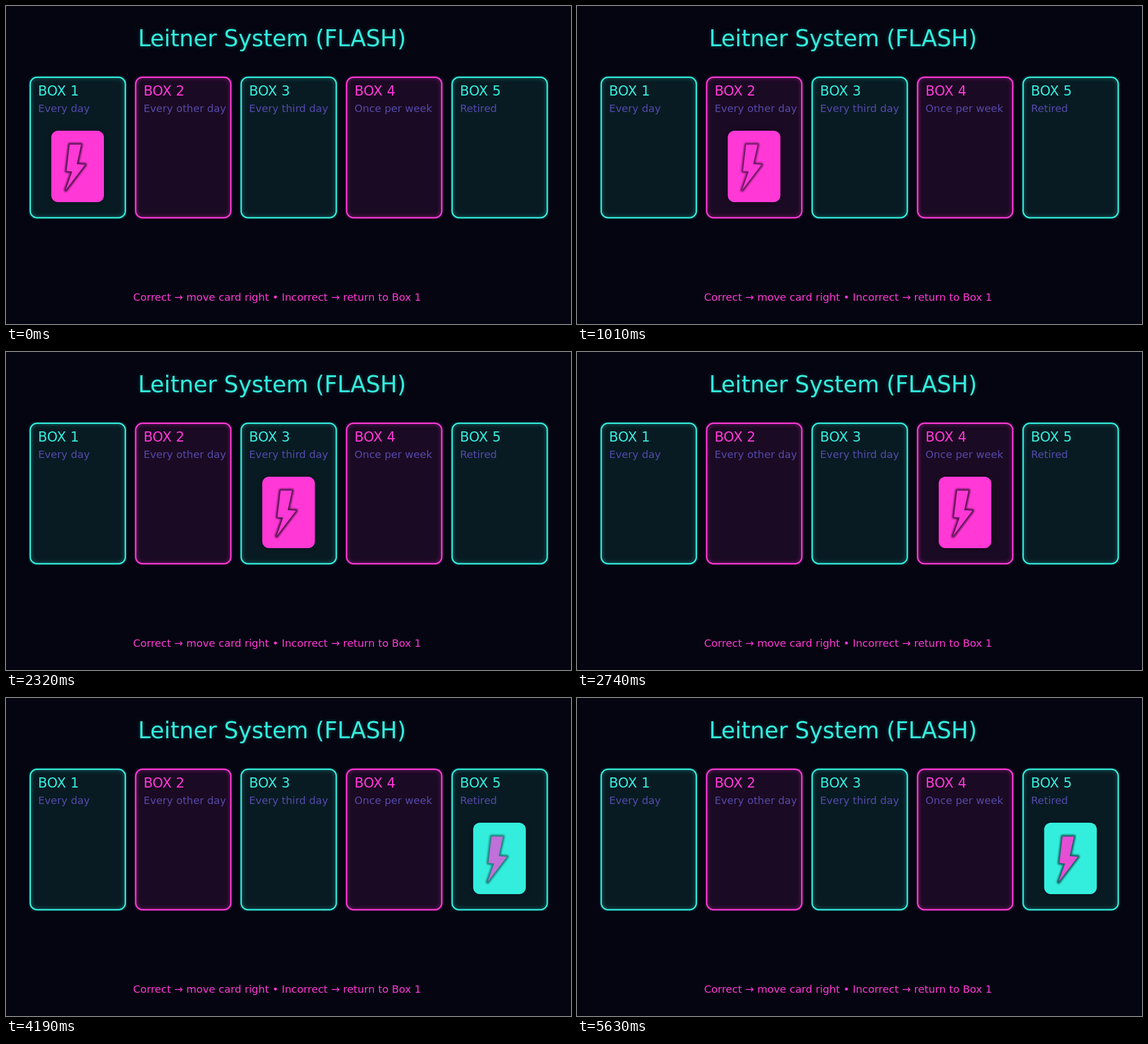
Animation, 998 px wide and 561 px high, one loop 5.75 s. Source, as an HTML page:

```html
<!DOCTYPE html>
<html lang="en">
<head>
<meta charset="utf-8">
<title>Leitner System</title>
<style>
  :root { --cyan: #33eedd; --pink: #ff38d6; --bg: #040511; }
  html, body { margin: 0; width: 100%; height: 100%; overflow: hidden; background: var(--bg); }
  #stage { position: absolute; left: 0; top: 0; width: 998px; height: 561px; overflow: hidden; }
  #stage > svg { position: absolute; left: 0; top: 0; }
  text { font-family: "DejaVu Sans", sans-serif; white-space: pre; }
  .title { font-size: 39.95px; fill: var(--cyan); text-shadow: 0 0 6px rgba(51, 238, 221, .3); }
  .rule { font-size: 18.35px; fill: var(--pink); }
  .name { font-size: 23.9px; fill: var(--hue); }
  .when { font-size: 18.3px; fill: #5549aa; }
  .fill { fill: var(--hue); fill-opacity: .09; }
  .halo {
    fill: none; stroke: var(--hue); stroke-width: 6; opacity: .24;
    filter: blur(3px); clip-path: inset(0 round 12px);
  }
  .edge { fill: none; stroke: var(--hue); stroke-width: 2.5; }
  #gold {
    position: absolute; left: 787px; top: 125px; width: 170px; height: 249px; border-radius: 13px;
    box-shadow: 0 0 10px rgba(120, 85, 30, .35), inset 0 0 46px rgba(120, 85, 30, .72);
    opacity: 0;
  }
  #card {
    position: absolute; left: 80px; top: 220px; width: 93px; height: 126px;
    border-radius: 12px; background: var(--pink); box-shadow: 0 0 7px rgba(4, 5, 16, .5);
  }
  #card svg { position: absolute; left: 0; top: 0; overflow: visible; }
  .bolt { fill: var(--pink); }
  .shade { fill: none; stroke: #040510; stroke-width: 6.5; stroke-linejoin: round; opacity: .68; filter: blur(1.4px); }
</style>
</head>
<body>
<div id="stage">
  <svg width="998" height="561" viewBox="0 0 998 561">
    <text class="title" x="233.2" y="71">Leitner System (FLASH)</text>
    <g id="boxes"></g>
    <text class="rule" x="224.4" y="520">Correct → move card right • Incorrect → return to Box 1</text>
  </svg>
  <div id="gold"></div>
  <div id="card">
    <svg width="93" height="126">
      <defs><polygon id="zigzag" points="32.5,24.5 52.5,24.5 45,59 59.5,60 25.5,104.5 37,72 27,71"/></defs>
      <g id="flash">
        <use class="shade" href="#zigzag"/>
        <use class="bolt" href="#zigzag"/>
      </g>
    </svg>
  </div>
</div>
<script>
  const LOOP = 5750, STEP = 1160, GAP = 186.3;
  const MOVES = 4;
  const hue = i => i % 2 ? 'var(--pink)' : 'var(--cyan)';
  const get = id => document.getElementById(id);

  const schedule = ['Every day', 'Every other day', 'Every third day', 'Once per week', 'Retired'];
  const rect = cls => `<rect class="${cls}" x="42.8" y="125.8" width="168" height="247.7" rx="12"/>`;
  get('boxes').innerHTML = schedule.map((when, i) => `
    <g transform="translate(${i * GAP})" style="--hue:${hue(i)}">
      ${rect('fill')}${rect('halo')}${rect('edge')}
      <text class="name" x="56.6" y="158.3">BOX ${i + 1}</text>
      <text class="when" x="56.7" y="187.3">${when}</text>
    </g>`).join('');

  // Each step holds eight poses; the closing pulse is paced a little differently.
  const beats = [0, 140, 280, 420, 570, 710, 860, 1010];
  const lastBeats = [0, 150, 300, 450, 600, 740, 870, 990];
  const travel = [0, .325, .65, 1, 1, 1, 1, 1];
  const flicker = [1, 1, 1, 1, 1, .69, .63, .88];

  const card = get('card'), flash = get('flash'), gold = get('gold');

  function draw(time) {
    const t = time % LOOP;
    const step = Math.min(Math.floor(t / STEP), MOVES);
    const ending = step === MOVES;
    const local = t - step * STEP;
    const beat = (ending ? lastBeats : beats).filter(b => b <= local).length - 1;
    const place = ending ? MOVES : step + travel[beat];

    card.style.transform = `translateX(${place * GAP}px)`;
    card.style.background = hue(Math.min(step + 1, MOVES));
    flash.style.opacity = flicker[beat];
    gold.style.opacity = ending ? Math.max(0, Math.sin(Math.PI * beat / 5)) : 0;
  }

  const start = performance.now();
  function tick() {
    draw(performance.now() - start);
    requestAnimationFrame(tick);
  }
  tick();
</script>
</body>
</html>
```
